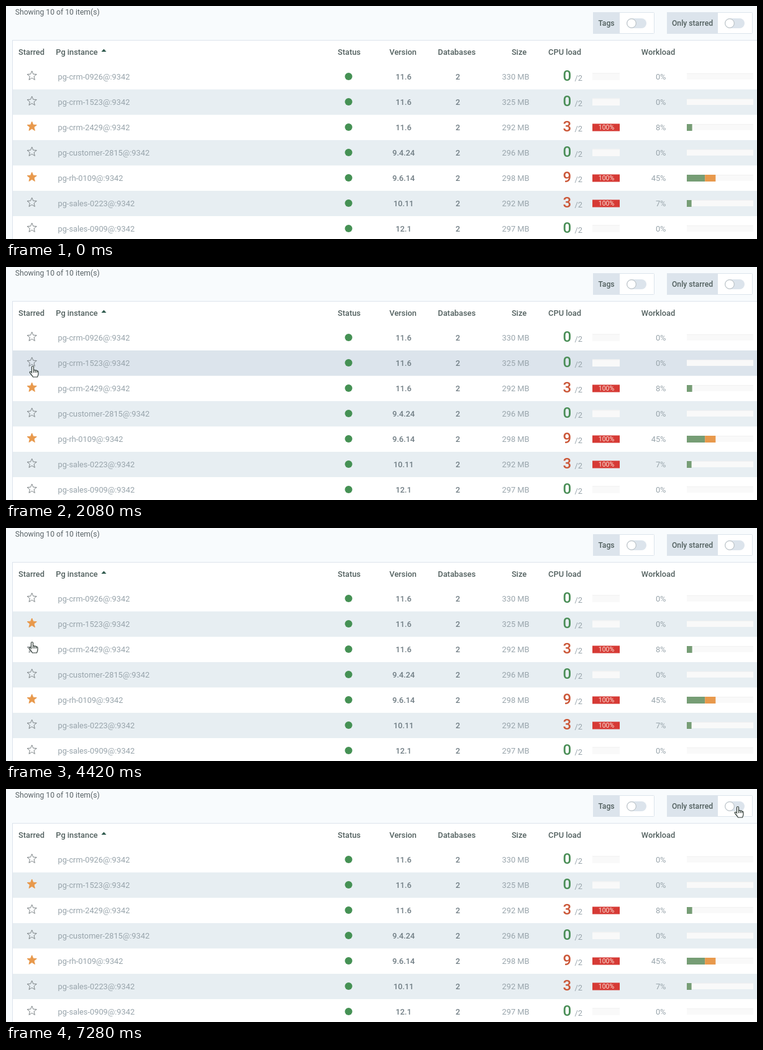
Write an HTML page that moves like this. It is 1209 by 377 pixels and loops after 8000 ms.

```html
<!DOCTYPE html>
<html lang="en">
<head>
<meta charset="utf-8">
<title>Instances</title>
<style>
  html, body { margin: 0; width: 100%; height: 100%; overflow: hidden; background: #f8fbfd; }
  svg { display: block; font: 12.8px Roboto, sans-serif; }
  .head { font-weight: 500; fill: #52605f; }
  .strong { font-weight: 500; fill: #707d84; }
  .soft { fill: #98a4ab; }
  .big { font-size: 24px; font-weight: 500; }
  .note { font-size: 12.2px; }
</style>
</head>
<body>
<svg id="stage" width="1209" height="377" viewBox="0 0 1209 377"></svg>
<script>
const LOOP = 8000, STEP = 130, ROW = 41, TOP = 94;
const LINE = '#dce4ec', GREEN = '#459154', ORANGE = '#e8994c', RED = '#d63a35';

// name, version, size, cpu, workload %
const rows = [
  ['pg-crm-0926@:9342', '11.6', 330, 0, 0],
  ['pg-crm-1523@:9342', '11.6', 325, 0, 0],
  ['pg-crm-2429@:9342', '11.6', 292, 3, 8],
  ['pg-customer-2815@:9342', '9.4.24', 296, 0, 0],
  ['pg-rh-0109@:9342', '9.6.14', 298, 9, 45],
  ['pg-sales-0223@:9342', '10.11', 292, 3, 7],
  ['pg-sales-0909@:9342', '12.1', 297, 0, 0]
];

// Pointer stops: step, x, y
const path = [
  [5, 1222, 262], [9, 160, 200], [11, 38, 171], [12, 40, 165], [14, 43, 160],
  [24, 43, 160], [27, 43, 180], [30, 42, 184], [34, 42, 184], [39, 222, 60],
  [40, 249, 23], [41, 300, 28], [43, 500, 58], [47, 1010, 62], [48, 1067, 55],
  [51, 1140, 36], [54, 1178, 28]
];

const rect = (x, y, w, h, fill, more = '') =>
  `<rect x="${x}" y="${y}" width="${w}" height="${h}" fill="${fill}" ${more}/>`;
const text = (s, x, y, cls, anchor = 'start', more = '') =>
  `<text x="${x}" y="${y}" class="${cls}" text-anchor="${anchor}" ${more}>${s}</text>`;
const dot = (x, y, r, fill, more = '') =>
  `<circle cx="${x}" cy="${y}" r="${r}" fill="${fill}" ${more}/>`;

function star(x, y) {
  const pts = Array.from({ length: 10 }, (_, i) => {
    const r = i % 2 ? 3.5 : 8, a = i * Math.PI / 5;
    return (x + r * Math.sin(a)).toFixed(2) + ',' + (y - r * Math.cos(a)).toFixed(2);
  });
  return `<polygon class="star" points="${pts.join(' ')}"/>`;
}

function toggle(x, split, end, label) {
  return rect(x + .5, 10.5, end - x, 34, '#fff', `stroke="${LINE}" rx="1"`) +
    rect(x, 10, split - x, 35, LINE) +
    text(label, (x + split) / 2, 32, 'head note', 'middle') +
    rect(split + 11, 20, 32, 16, LINE, 'rx="8"') +
    dot(split + 19, 28, 7.3, '#fff', 'stroke="#b3bbbf"');
}

function track(x, y, w, h) {
  return rect(x, y, w, h, '#f9f9f9') + rect(x, y, w, 1, '#f1f1f1');
}

function row([name, version, size, cpu, load], i) {
  const y = TOP + i * ROW, mid = y + 20, base = y + 24.5;
  const green = Math.min(load, 27) * 1.08, rest = load * 1.03 - green;
  return rect(11, y, 1198, ROW, '#fff', 'class="band"') +
    star(41.7, mid - 1) +
    text(name, 83.5, base, 'soft') +
    dot(551.5, mid, 6, GREEN) +
    text(version, 640, base, 'strong', 'middle') +
    text(2, 727.5, base, 'strong', 'middle') +
    text(size + ' MB', 842.5, base, 'soft', 'end') +
    text(cpu, 896.5, y + 26.5, 'big', 'start', `fill="${cpu ? '#cb5738' : '#4a8e57'}"`) +
    text('/2', 915.5, y + 26.5, 'soft') +
    (cpu ? rect(944, mid - 5.5, 44, 12, RED) +
      text('100%', 966.5, mid + 4.2, '', 'middle', 'fill="#fbe6dc" font-size="10.5"')
      : track(944, mid - 5.5, 44, 11.5)) +
    text(load + '%', 1062.5, base, 'soft', 'end') +
    track(1096, mid - 5, 107, 10) +
    rect(1096, mid - 5, green.toFixed(1), 11, '#769d75') +
    (rest > 1 ? rect(1096 + green, mid - 5, rest.toFixed(1), 11, ORANGE) : '');
}

const titles = [['Starred', 41], ['Pg instance', 114], ['Status', 552.5], ['Version', 639],
  ['Databases', 725.7], ['Size', 826], ['CPU load', 899.5], ['Workload', 1050]];

const stage = document.getElementById('stage');
stage.innerHTML =
  text('Showing 10 of 10 item(s)', 14.7, 14, 'note', 'start', 'fill="#5b6468"') +
  toggle(945, 988, 1043, 'Tags') + toggle(1064, 1146, 1201, 'Only starred') +
  rect(10, 55, 1199, 322, LINE) +
  rect(11, 56, 1198, 38, '#fff', 'id="header"') +
  titles.map(([s, x]) => text(s, x, 79, 'head', 'middle')).join('') +
  '<path d="M153.5 74L157.5 69.5L161.5 74Z" fill="#2f5a4d"/>' +
  rows.map(row).join('') +
  `<path id="arrow" d="M0 0V15.5L3.6 12.2L6.2 18L8.8 16.9L6.3 11.3H11Z"
    fill="#000" stroke="#fff" stroke-width=".8"/>
  <path id="hand" d="M-1.5 10V2Q-1.5.5 0 .5T1.5 2V7Q3 6 4.2 7.3Q6 6.4 6.8 8.2Q9 7.8 9 10V13Q9 15 7.5 18H.5Q-1 15.5-4 12Q-5.5 10.5-4.5 9.5Q-3 9-1.5 11ZM1.5 7V11M4.2 7.3V11M6.8 8.2V11"
    fill="#fff" stroke="#333f3a" stroke-width="1.2"/>`;

const header = document.getElementById('header');
const arrow = document.getElementById('arrow');
const hand = document.getElementById('hand');
const bands = [...stage.querySelectorAll('.band')];
const stars = [...stage.querySelectorAll('.star')];

function pointer(k) {
  const j = path.findIndex(p => p[0] >= k);
  if (j < 0) return path[path.length - 1].slice(1);
  if (j === 0) return path[0].slice(1);
  const [a, b] = [path[j - 1], path[j]], f = (k - a[0]) / (b[0] - a[0]);
  return [1, 2].map(n => a[n] + (b[n] - a[n]) * f);
}

// The highlight trails the pointer by one step and clears after the second click.
function hovered(k) {
  const [x, y] = pointer(k - 1);
  if (x > 1208 || y < 55 || (k >= 30 && k <= 34)) return null;
  return Math.floor((y - TOP) / ROW);
}

function draw(k) {
  const [x, y] = pointer(k), over = hovered(k);
  const onHand = (k >= 12 && k <= 34) || (x > 1156 && y < 45);
  for (const [el, show] of [[arrow, !onHand], [hand, onHand]]) {
    el.setAttribute('transform', `translate(${x} ${y})`);
    el.setAttribute('visibility', show && k > 5 ? 'visible' : 'hidden');
  }
  header.setAttribute('fill', over === -1 ? LINE : '#fff');
  bands.forEach((b, i) => b.setAttribute('fill', i === over ? LINE : i % 2 ? '#e7eef2' : '#fff'));
  const lit = [0, k >= 18, k < 30, 0, 1, 0, 0];
  stars.forEach((s, i) => {
    s.setAttribute('fill', lit[i] ? ORANGE : 'none');
    s.setAttribute('stroke', lit[i] ? ORANGE : '#7d8487');
  });
}

function tick() {
  draw(Math.floor(performance.now() % LOOP / STEP));
  requestAnimationFrame(tick);
}
tick();
</script>
</body>
</html>
```
